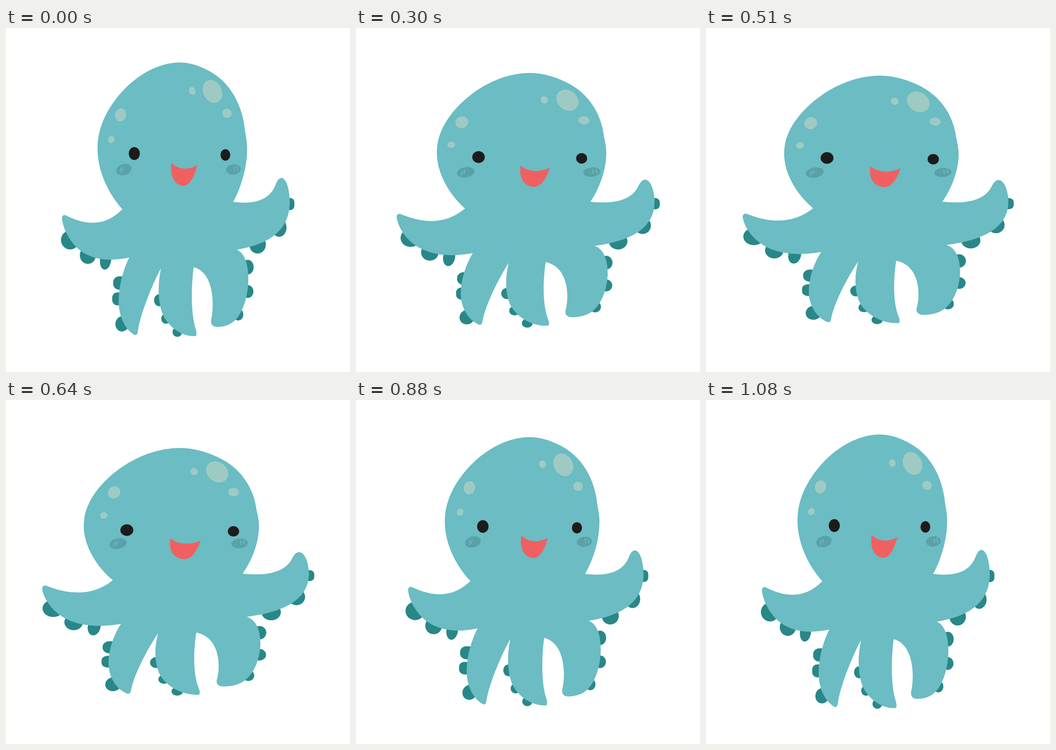
Recreate the animation shown at these times as an HTML page. Size 748 by 748 pixels, loop 1110 ms.

```html
<!DOCTYPE html>
<html lang="en">
<head>
<meta charset="utf-8">
<title>Octopus</title>
<style>
  html, body { margin: 0; width: 100%; height: 100%; overflow: hidden; background: #fff; }
  svg { display: block; width: 100%; height: 100%; }
  .sucker { fill: #298787; }
  .skin { fill: #6bbcc3; }
  .eye { fill: #1d1b1b; }
  .mouth { fill: #f06060; }
  .spot { fill: #9fcac4; }
  .cheek { fill: #5aa1a8; }
  .shine { fill: none; stroke: #6bbcc3; stroke-width: 2; stroke-linecap: round; }
</style>
</head>
<body>
<svg viewBox="0 0 748 748">
  <g class="sucker" data-track="arm">
    <ellipse cx="139.5" cy="461" rx="20" ry="20.5"/>
    <ellipse cx="178" cy="494" rx="17.5" ry="19"/>
    <ellipse cx="216.5" cy="505" rx="12" ry="20.5" transform="rotate(8 216.5 505)"/>
  </g>
  <g class="sucker" data-track="leg">
    <rect x="233" y="540" width="30" height="29" rx="13"/>
    <rect x="231" y="575" width="26" height="28" rx="11"/>
    <ellipse cx="253" cy="643" rx="15" ry="17" transform="rotate(15 253 643)"/>
  </g>
  <g class="sucker" data-track="follow">
    <ellipse cx="333" cy="592" rx="11" ry="13"/>
    <ellipse cx="348" cy="632" rx="10.5" ry="11"/>
    <ellipse cx="372.5" cy="661" rx="10.5" ry="10.5"/>
    <ellipse cx="526" cy="520" rx="12.5" ry="16"/>
    <ellipse cx="525.5" cy="573" rx="12.5" ry="14"/>
    <ellipse cx="505" cy="623" rx="11" ry="13"/>
  </g>
  <g data-track="body">
    <g class="sucker">
      <rect x="606" y="369.5" width="21" height="26.5" rx="9"/>
      <ellipse cx="594" cy="434" rx="16" ry="20"/>
      <ellipse cx="547" cy="471" rx="18" ry="19.5"/>
    </g>
    <path class="skin" d="M378 75C404 75 432 86 455.5 102C489 125 514 168 519.5 222C521.5 236 524.3 246 524.3 264
      C524.3 302 512 345 494 378C545 385 575 371 586 341C590 331 594 326 599 326
      C611 327 617 356 617 378C617 438 575 470 502 482C520 490 527 515 527 548
      C526 590 512 625 494 639C484 647 470 650 459 650C449 650 443 643 447 630
      C454 590 448 530 408 520C403 560 401 620 413 656
      C415 664 415 670 411 670C380 671 350 648 339 618C330 590 330 555 337 522
      C313 568 292 625 287 657C286 666 284 669 279 667C258 655 245 625 245 595
      C245 560 255 525 268 499C215 511 170 501 143 465C131 449 124 431 122 417
      C121 408 125 404 133 409C180 432 220 428 253 394C222 360 199 310 199 263
      C199 221 215 187 237 157C272 110 325 75 378 75Z"/>
    <ellipse class="eye" cx="279" cy="273" rx="12" ry="14"/>
    <ellipse class="eye" cx="477" cy="276" rx="10.5" ry="12.5"/>
    <path class="mouth" d="M360 293C376 309 397 309 416 298C408 328 398 343 385 343C365 341 356 320 360 293Z"/>
  </g>
  <g data-track="face">
    <ellipse class="spot" cx="249" cy="189" rx="12" ry="14.5" transform="rotate(12 249 189)"/>
    <ellipse class="spot" cx="229" cy="242.5" rx="7" ry="8" transform="rotate(20 229 242.5)"/>
    <ellipse class="cheek" cx="256.5" cy="308" rx="17" ry="12" transform="rotate(-18 256.5 308)"/>
    <path class="shine" d="M248 314L250 304.5M253 311L255 303.5"/>
    <ellipse class="cheek" cx="494.5" cy="307.5" rx="16" ry="11" transform="rotate(-8 494.5 307.5)"/>
    <path class="shine" d="M496 301L497.5 310.5M502 301L504 310"/>
  </g>
  <g data-track="crown">
    <ellipse class="spot" cx="449" cy="138" rx="20" ry="26" transform="rotate(-25 449 138)"/>
    <ellipse class="spot" cx="405" cy="137" rx="7" ry="8.7" transform="rotate(-15 405 137)"/>
    <ellipse class="spot" cx="480.5" cy="185.5" rx="10.5" ry="9.8" transform="rotate(20 480.5 185.5)"/>
  </g>
</svg>
<script>
  const LOOP = 1110, STEPS = 33;
  const CENTER = 374, STRETCH = 0.171, SQUASH = 0.098;

  function bezier(x1, y1, x2, y2) {
    const at = (a, b, s) => 3 * (1 - s) * s * ((1 - s) * a + s * b) + s ** 3;
    return x => {
      let lo = 0, hi = 1;
      for (let i = 0; i < 24; i++) {
        const mid = (lo + hi) / 2;
        if (at(x1, x2, mid) < x) lo = mid; else hi = mid;
      }
      return at(y1, y2, (lo + hi) / 2);
    };
  }

  const ease = bezier(0.25, 0.1, 0.25, 1);
  const quick = bezier(0.25, 0.3, 0.25, 1);
  const soft = bezier(0.4, 0.1, 0.35, 1);

  // start and peak are in steps; every part settles at the end of the loop
  const tracks = {
    body: { start: 0, peak: 19, amount: 1, up: ease, down: ease },
    follow: { start: 2, peak: 19, amount: 0.98, up: ease, down: ease },
    leg: { start: 4, peak: 19, amount: 0.95, up: ease, down: soft },
    arm: { start: 5, peak: 19, amount: 0.92, up: quick, down: soft },
    face: { start: 0, peak: 15, amount: 1, up: ease, down: ease },
    crown: { start: 0, peak: 16.5, amount: 0.98, up: ease, down: ease }
  };

  const clamp = v => Math.min(1, Math.max(0, v));

  function squash({ start, peak, amount, up, down }, step) {
    return amount * (step < peak
      ? up(clamp((step - start) / (peak - start)))
      : 1 - down(clamp((step - peak) / (STEPS - peak))));
  }

  const parts = [...document.querySelectorAll("[data-track]")];
  const begin = performance.now();

  function draw() {
    const time = (performance.now() - begin) % LOOP;
    // step times are rounded to 10 ms, hence the small lead
    const step = Math.floor((time + 4) * STEPS / LOOP) % STEPS;
    for (const part of parts) {
      const k = squash(tracks[part.dataset.track], step);
      part.setAttribute("transform",
        `translate(${CENTER} ${CENTER}) scale(${1 + STRETCH * k} ${1 - SQUASH * k}) translate(${-CENTER} ${-CENTER})`);
    }
    requestAnimationFrame(draw);
  }
  draw();
</script>
</body>
</html>
```
